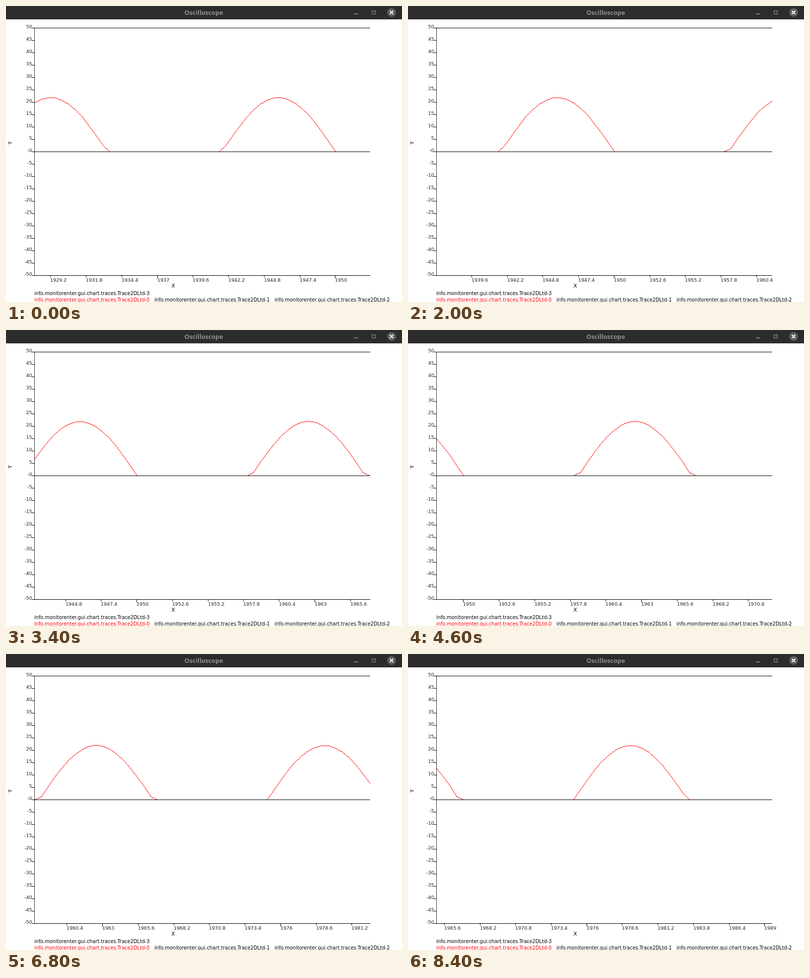
Recreate the animation shown at these times as an HTML page with a canvas. Size 798 px wide and 598 px high, loop 8.6 s.

```html
<!DOCTYPE html>
<html lang="en">
<head>
<meta charset="utf-8">
<title>Oscilloscope</title>
<style>
  html, body { margin: 0; width: 100%; height: 100%; overflow: hidden; background: #fff; }
  canvas { display: block; }
</style>
</head>
<body>
<canvas id="scope" width="798" height="598"></canvas>
<script>
const ctx = document.getElementById('scope').getContext('2d');
const LOOP = 8600;
const LEFT = 57, RIGHT = 733, TOP = 44, ZERO = 294, BOTTOM = 544;
const SAMPLE = 0.5, SPAN = 24.5, START = 1928;
const SCALE = (RIGHT - LEFT) / SPAN;
const TICK_STEP = 2.6, TICK_ORIGIN = 1950;
const FONT = '"DejaVu Sans", sans-serif';
const TRACE = 'info.monitorenter.gui.chart.traces.Trace2DLtd-';

// Each pair: wait in tenths of a second, then samples to scroll.
const burst = '32 22 22 11 11 11 ';
const steps = ('11 11 31 22 22 11 11 22 22 11 22 22 11 21 34 31 21 11 11 11 ' +
  '21 22 22 22 22 22 11 11 ' + burst.repeat(3) + '32 22 11').split(' ');

function scrolledSamples(time) {
  let at = 0, samples = 0;
  for (const [wait, advance] of steps) {
    at += wait * 100;
    if (time < at) break;
    samples += +advance;
  }
  return samples;
}

const signal = x => Math.max(0, -22 * Math.sin(2 * Math.PI * 0.06 * x));

function rect(color, x, y, w, h) {
  ctx.fillStyle = color;
  ctx.fillRect(x, y, w, h);
}

function text(str, x, y, { color = '#000', font = '9.77px ' + FONT, align = 'left' } = {}) {
  ctx.fillStyle = color;
  ctx.font = font;
  ctx.textAlign = align;
  ctx.fillText(str, x, y);
}

// Pixel line without smoothing.
function pixelLine(x0, y0, x1, y1) {
  const n = Math.max(Math.abs(x1 - x0), Math.abs(y1 - y0));
  for (let i = 0; i <= n; i++) {
    ctx.fillRect(Math.round(x0 + (x1 - x0) * i / n), Math.round(y0 + (y1 - y0) * i / n), 1, 1);
  }
}

function drawTitleBar() {
  rect('#2c2c2c', 0, 0, 798, 27);
  text('Oscilloscope', 398.5, 18,
    { color: '#8e8e8c', font: 'bold 12.6px "Open Sans", sans-serif', align: 'center' });
  rect('#7c7c7c', 701, 15, 8, 2);
  ctx.lineWidth = 1.5;
  ctx.strokeStyle = '#7c7c7c';
  ctx.strokeRect(737.75, 9.75, 6.5, 6.5);
  ctx.fillStyle = '#5c5c5c';
  ctx.beginPath();
  ctx.arc(777, 13, 9, 0, 2 * Math.PI);
  ctx.fill();
  ctx.lineWidth = 2;
  ctx.strokeStyle = '#fff';
  ctx.beginPath();
  ctx.moveTo(773.5, 9.5); ctx.lineTo(780.5, 16.5);
  ctx.moveTo(780.5, 9.5); ctx.lineTo(773.5, 16.5);
  ctx.stroke();
}

function drawFrame() {
  rect('#333', LEFT, TOP, 1, BOTTOM - TOP + 1);
  for (const y of [TOP, ZERO, BOTTOM]) rect('#000', LEFT, y, RIGHT - LEFT + 1, 1);
  for (let v = 50; v >= -50; v -= 5) {
    const y = ZERO - 5 * v;
    rect('#000', LEFT - 5, y, 5, 1);
    text(v === 0 ? '-0' : v, 52.5, y + 1, { align: 'right', color: '#222', font: '9.5px ' + FONT });
  }
  text('X', 337, 569, { align: 'center', font: '10px ' + FONT });
  ctx.save();
  ctx.translate(12, 276.5);
  ctx.rotate(-Math.PI / 2);
  text('Y', 0, 0, { align: 'center', font: '10px ' + FONT });
  ctx.restore();
  text(TRACE + 3, 57, 584);
  text(TRACE + 0, 57, 597, { color: '#f00' });
  text(TRACE + 1, 299, 597);
  text(TRACE + 2, 541, 597);
}

function drawTimeTicks(start) {
  const first = Math.ceil((start - TICK_ORIGIN) / TICK_STEP + 1e-6);
  const last = Math.floor((start + SPAN - TICK_ORIGIN) / TICK_STEP + 1e-6);
  for (let k = first; k <= last; k++) {
    const value = TICK_ORIGIN + k * TICK_STEP;
    const x = Math.floor(LEFT - 0.25 + (value - start) * SCALE);
    rect('#000', x, BOTTOM, 1, k % 5 ? 4 : 6);
    text(+value.toFixed(1), x, 557, { color: '#222', font: '9.5px ' + FONT });
  }
}

function drawSignal(start) {
  const point = i => [
    Math.round(LEFT + i * SAMPLE * SCALE),
    ZERO - Math.floor(5 * signal(start + i * SAMPLE) + 1e-6)
  ];
  ctx.fillStyle = '#f00';
  for (let i = 0; i < SPAN / SAMPLE; i++) pixelLine(...point(i), ...point(i + 1));
}

function render() {
  const start = START + scrolledSamples(performance.now() % LOOP) * SAMPLE;
  rect('#fff', 0, 0, 798, 598);
  drawTitleBar();
  drawSignal(start);
  drawFrame();
  drawTimeTicks(start);
  requestAnimationFrame(render);
}
render();
</script>
</body>
</html>
```
